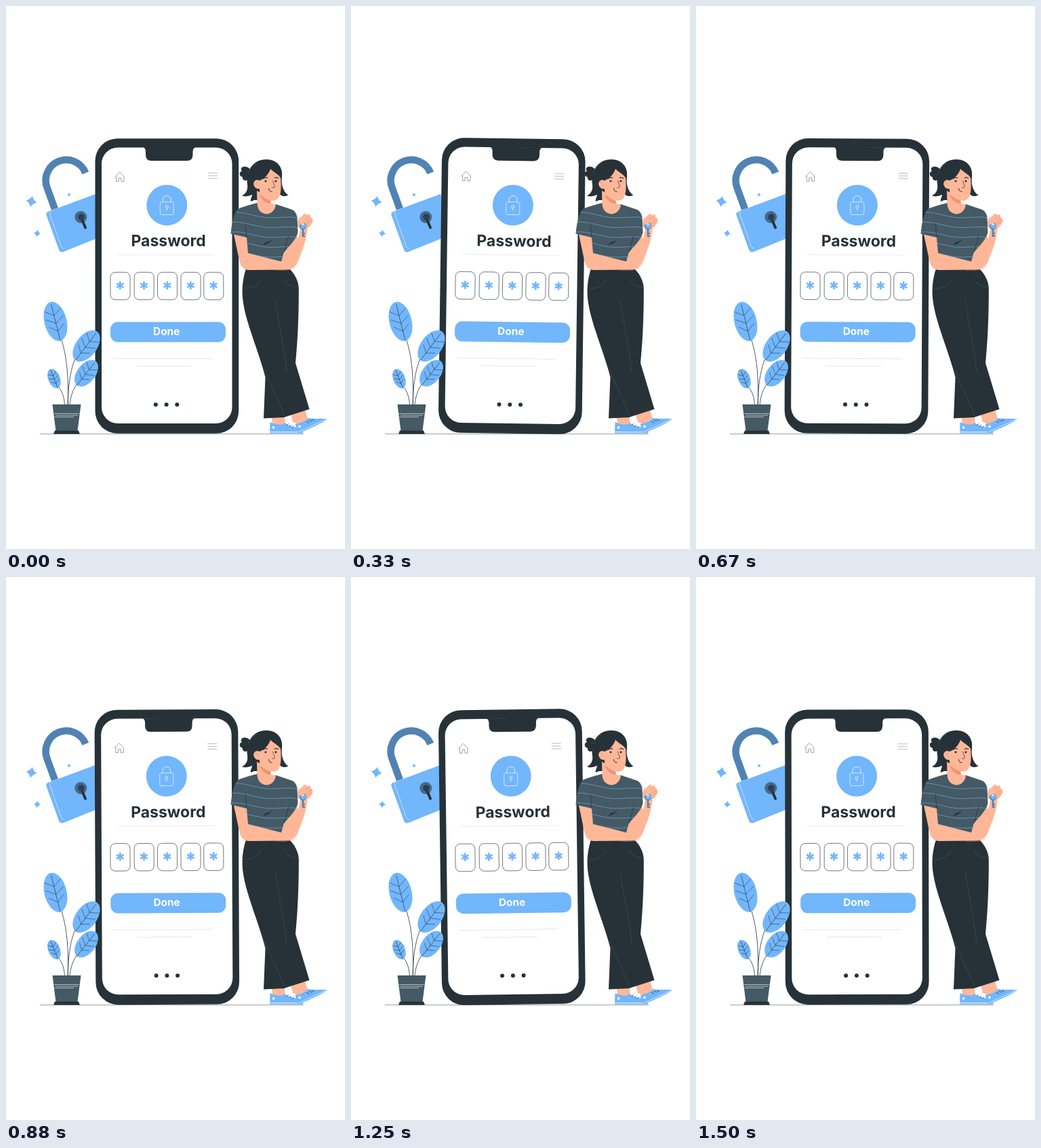
These frames come from a looping animation (500 by 800 pixels, 1.54 s). An HTML page with a canvas:

```html
<!DOCTYPE html>
<html lang="en">
<head>
<meta charset="utf-8">
<title>Password</title>
<style>
html, body { margin: 0; width: 100%; height: 100%; overflow: hidden; background: #fff; }
canvas { display: block; width: 500px; height: 800px; }
</style>
</head>
<body>
<canvas id="stage" width="500" height="800"></canvas>
<script>
const ctx = document.getElementById('stage').getContext('2d');
const BLUE = '#72b6fc', STEEL = '#5083b3', INK = '#263238', SLATE = '#455a64';
const SKIN = '#ffb798', SHADE = '#ef9477', PALE = '#d9dcde';
const LOOP = 1540, STEPS = 37;

function fill(d, color) {
  ctx.fillStyle = color;
  ctx.fill(new Path2D(d));
}

function line(d, color = INK, width = 0.8) {
  ctx.strokeStyle = color;
  ctx.lineWidth = width;
  ctx.stroke(new Path2D(d));
}

function dot(x, y, r, color) {
  ctx.fillStyle = color;
  ctx.beginPath();
  ctx.arc(x, y, r, 0, Math.PI * 2);
  ctx.fill();
}

function box(x, y, w, h, r, color, stroked) {
  ctx.beginPath();
  ctx.roundRect(x, y, w, h, r);
  if (stroked) {
    ctx.strokeStyle = color;
    ctx.lineWidth = 0.8;
    ctx.stroke();
  } else {
    ctx.fillStyle = color;
    ctx.fill();
  }
}

function label(text, x, y, size, color) {
  ctx.font = `700 ${size}px Montserrat, Inter, sans-serif`;
  ctx.textAlign = 'center';
  ctx.fillStyle = color;
  ctx.fillText(text, x, y);
}

function placed(x, y, degrees, draw) {
  ctx.save();
  ctx.translate(x, y);
  ctx.rotate(degrees * Math.PI / 180);
  draw();
  ctx.restore();
}

function sparkle(x, y, r) {
  placed(x, y, 10, () => {
    const k = r * 0.29;
    fill(`M0 ${-r} Q${k} ${-k} ${r} 0 Q${k} ${k} 0 ${r} Q${-k} ${k} ${-r} 0 Q${-k} ${-k} 0 ${-r}Z`, BLUE);
  });
}

function padlock() {
  line('M72 299 L60.7 268 A30.3 30.3 0 0 1 117.3 246', STEEL, 10.5);
  fill('M62 303 L132 277 L150 330 L131 343.5 L85 362 Q80 364 78 359 L59.5 308 Q58.500 304.500 62 303Z', BLUE);
  line('M65 303 Q64 306 65.500 309 L81 353 Q82.500 357 86 357.500', '#d7eaff', 0.8);
  dot(110.3, 311, 9, '#47688c');
  line('M110.5 311 L117.7 328', INK, 3.8);
  dot(111, 311, 4.8, '#2c3f50');
  sparkle(37.5, 288, 8);
  sparkle(46, 335, 5);
  sparkle(93, 278, 2.8);
}

function leaf(x, y, long, short, degrees) {
  placed(x, y, degrees, () => {
    ctx.fillStyle = BLUE;
    ctx.beginPath();
    ctx.ellipse(0, 0, short, long, 0, 0, Math.PI * 2);
    ctx.fill();
    line(`M0 ${-long * 0.88} V${long}`, INK, 0.6);
    for (const p of [-0.3, 0.1, 0.5]) {
      const reach = short * (0.86 - Math.abs(p) * 0.35);
      line(`M${-reach} ${(p - 0.3) * long} L0 ${p * long} L${reach} ${(p - 0.3) * long}`, INK, 0.5);
    }
  });
}

function plant() {
  line('M91.500 588 C92 550 91 522 82 492', INK, 0.8);
  line('M91 588 C92 552 96 535 102 519', INK, 0.8);
  line('M94 588 C95 575 99 565 105 556', INK, 0.8);
  line('M86.500 588 C86 577 83 568 78 562', INK, 0.8);
  leaf(73, 464.7, 29.5, 16.5, -14);
  leaf(118.5, 500.8, 26.5, 15.5, 37);
  leaf(118.5, 541, 22.5, 13.5, 38);
  leaf(71, 549, 15, 8.8, -22);
  fill('M68.500 587 H110.500 L105.500 626 H73.500Z', SLATE);
  fill('M72 625.500 H107 L109 630.500 H70Z', INK);
  line('M71 600.500 H108 M73 603 H106 M71.500 605.500 H100', '#dce3e6', 0.7);
}

function asterisk(x, y) {
  for (const turn of [0, 60, 120]) {
    placed(x, y, turn, () => line('M0 -6 V6', BLUE, 2.7));
  }
}

function phone() {
  box(131.5, 195.3, 211.7, 434.5, 33, INK);
  box(141, 208.5, 192.5, 406.5, 24, '#fff');
  fill('M202 208 H280 Q275.500 209 275.500 215 V219 Q275.500 228 267 228 H214.500 Q206 228 206 219 V215 Q206 209 202 208Z', INK);

  line('M160.500 252 L167.500 244.500 L174.700 251.500 M162.500 250.500 V258.500 H166 V253.500 H170 V258.500 H174 V251', '#858c90', 0.8);
  line('M298 246 H312 M298 250 H312 M298 254 H312', '#a4abae', 0.8);

  dot(237.3, 293.4, 30, BLUE);
  box(227.3, 288.8, 20, 18.7, 2.5, '#e8f3ff', true);
  line('M231.300 288.800 V285.500 A6 6 0 0 1 243.300 285.500 V288.800 M237.300 298 V301.500', '#e8f3ff', 0.9);
  ctx.beginPath();
  ctx.arc(237.3, 295.8, 2.1, 0, Math.PI * 2);
  ctx.stroke();

  label('Password', 239.6, 354.2, 23, INK);
  line('M163 366.700 H308', '#e9e9e9', 0.8);
  for (const x of [154, 189.2, 223.5, 258, 291.8]) {
    box(x, 392.3, 29, 40.5, 7, '#4f595e', true);
    asterisk(x + 14.3, 411.7);
  }
  box(154, 465.5, 170, 29.7, 11, BLUE);
  label('Done', 236.7, 484.6, 15.4, '#fff');
  line('M157 519.500 H304 M192 530.500 H274', PALE, 0.7);
  for (const x of [220.8, 236.6, 252.3]) dot(x, 587.2, 3, INK);
}

function shoes() {
  fill('M391 602 H410 L412 615 L394 620Z', SKIN);
  fill('M389.500 613 C398 617 406 618 411 614 C417 619 428 621 438 623 L438 629.500 H389Z', BLUE);
  line('M389 627.500 H437', '#dceeff', 1);
  fill('M418 594 L440 592 L445 608 L432 616 L423 613Z', SKIN);
  fill('M427 615.500 C435 615 441 611 446 607 C454 609 464 607 474 608.500 C466 615 449 622 432 629.500Q427 622 427 615.500Z', BLUE);
  line('M432 627.500 C448 620 462 614 472 609', '#dceeff', 0.9);
  line('M414 618 L417 615 M418 620 L421 617 M422 621.500 L425 618.500 M443 612 L447 614 M447 610 L451 612 M451 609 L455 611', INK, 0.7);
  dot(394.5, 621, 2, '#e8f3ff');
  dot(433, 619.5, 2, '#e8f3ff');
}

function trousers() {
  fill('M354 387 H418 C425 394 431.500 404 431.800 416 C432 458 430 495 427 526 L447.500 594 L411.500 605.500 L411 606 L380 607.500 L382.500 547 C374 512 355 470 350 438 C347 419 349 402 354 387Z', INK);
  line('M397 433 C402 470 410 500 414 540', SLATE, 0.5);
  line('M381 536 L411 603', SLATE, 0.5);
  line('M351 416 C362 417 373 412 376 402 M410 402 C414 410 421 414 430 414', SLATE, 0.6);
}

function torso() {
  // Arms sit beneath the sleeves and the hem.
  fill('M335 332 L357 337 L361 363 L407 373 L413 356 L427 334 L431 343 L435 324 L445 325 C444 343 437 361 430 378 Q426 388 412 388.500 L359 389 C350 389 346 383 344 374Z', SKIN);
  line('M361 363 L407 375 M397 389 C410 389 420 390 427 385 M409 371 L414 365', SHADE, 0.6);
  fill('M431 326 C429 318 431 312 435 311 L438 308 C441 305 443 306 444 308 C448 306 450 308 449 311 C453 313 454 317 451 320 C449 326 443 329 437 329Z', SKIN);
  line('M441 314 L446 310 M443 318 L450 314 M444 321 L451 318', SHADE, 0.8);

  const shirt = 'M371 290 C379 297 388 297 398 292 L422 300 Q428 303 429.500 311 L430.500 334 C427 346 416 355 410 363 L406 376.500 L357 364 L355 341 L331.500 335.500 C333 321 335 307 342 299 Q354 294 371 290Z';
  fill(shirt, SLATE);
  ctx.save();
  ctx.clip(new Path2D(shirt));
  for (let y = 304; y < 372; y += 14.5) {
    line(`M331 ${y} C352 ${y - 2} 370 ${y + 8} 390 ${y + 8} S420 ${y + 5} 432 ${y + 9}`, '#6ba6e0', 0.7);
  }
  ctx.restore();
  line('M355 341 L353 320 M410 363 L417 338', INK, 0.7);
  fill('M379 352 C387 351 393 346 395 338 C393 345 389 347 383 348Z', INK);

  line('M438 327 L438 340', STEEL, 2.7);
  line('M438 335 H441 M438 339 H441', STEEL, 1.8);
  dot(438, 324, 5.2, STEEL);
  dot(438.5, 323.5, 4.2, BLUE);
  dot(438, 321.5, 1.2, '#fff');
  fill('M432 319 C434 316 438 316 440 318 L438 321 L433 322Z', SKIN);
}

function head() {
  fill('M358 253 C355 260 348 257 349 252 C344 251 343 245 348 243 C344 239 350 235 355 237 Q362 239 361 248Z', INK);
  fill('M356 263 C353 242 365 226 384 226 C400 226 409 238 407 252 C405 265 411 276 416.500 278.500 Q409 283 402 276 L391 286 H366 L361 288 C360 285 363 281 363 278 Q355 282 348 279.500 C355 276 357 270 356 263Z', INK);
  fill('M370 272 L389 284 L391 291 L398 292.500 C397 303 388 308 381 306 C374 304 370.500 298 370.500 290Z', SKIN);
  fill('M374 278 C378 288 385 292 391 291 L390 285Z', SHADE);
  fill('M374 257 C381 255 388 247 390 240 C395 245 402 248 405 253 C406 264 406 276 403 281 C399 291 383 287 374 276Z', SKIN);
  fill('M375 258 C369 253 363 259 366 265 Q369 271 376 269Z', SKIN);
  line('M368 259 Q371 260 372 265', SHADE, 0.8);
  line('M379 254.500 Q383 251.500 386 253.500 M396 253.500 Q399 251.500 402 254', INK, 1.2);
  dot(383, 258, 1.5, INK);
  dot(398, 258, 1.5, INK);
  line('M393.500 257 L396.500 266.500 Q395 268.500 392 267.500', INK, 0.7);
  line('M387.500 268.500 Q388 274 392.500 273.500', INK, 1);
  line('M357 246 Q361 236 370 231', SLATE, 0.6);
}

// One degree each way at constant speed.
function swing(p) {
  if (p < 0.25) return p * 4;
  return p < 0.75 ? 2 - p * 4 : p * 4 - 4;
}

function render(now) {
  const step = Math.floor((now % LOOP) / LOOP * STEPS);
  ctx.fillStyle = '#fff';
  ctx.fillRect(0, 0, 500, 800);
  padlock();
  line('M50 630.500 H439', '#5d676c', 0.6);
  placed(237.4, 412.5, swing(step / STEPS), () => {
    ctx.translate(-237.4, -412.5);
    phone();
  });
  plant();
  shoes();
  trousers();
  torso();
  head();
}

const start = performance.now();
function tick() {
  render(performance.now() - start);
  requestAnimationFrame(tick);
}
tick();
</script>
</body>
</html>
```
